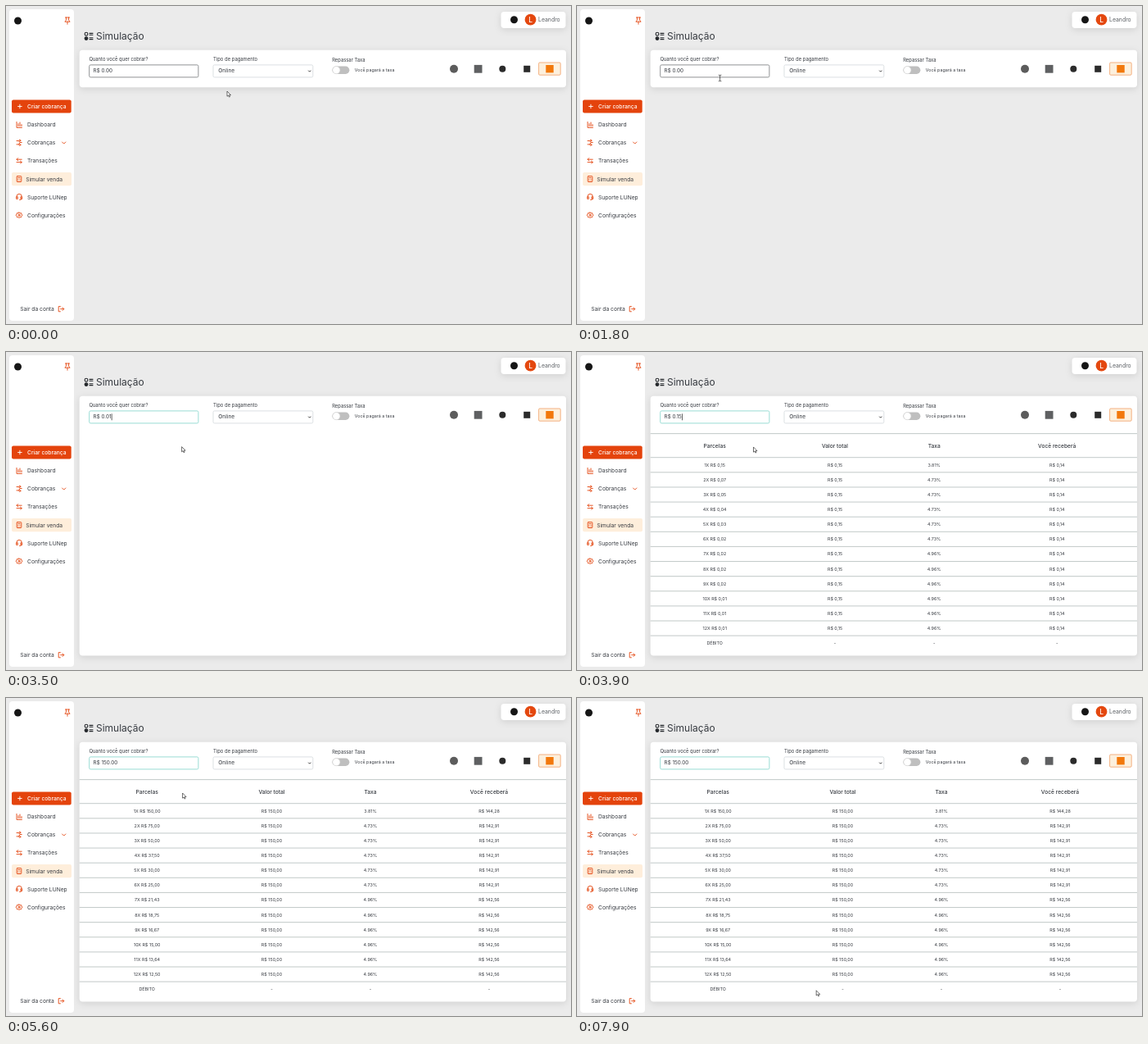
An HTML page that plays this animation: 690x388 px, repeating every 8 s.

```html
<!DOCTYPE html>
<html lang="pt-BR">
<head>
<meta charset="utf-8">
<title>Simulação</title>
<style>
  html, body { margin: 0; width: 100%; height: 100%; overflow: hidden; background: #ebebeb; }
  svg { display: block; width: 100vw; height: 100vh; }
  text { font-family: Inter, "Open Sans", sans-serif; fill: #363a40; white-space: pre; }
  .card { fill: #fff; filter: drop-shadow(0 2px 4px rgba(0, 0, 0, .11)); }
  .icon { fill: none; stroke: #e5501c; stroke-width: .95; stroke-linecap: round; stroke-linejoin: round; }
  .rule { stroke: #b3bbba; stroke-width: .8; }
  .mid { text-anchor: middle; }
</style>
</head>
<body>
<svg id="stage" viewBox="0 0 690 388">
  <rect width="690" height="388" fill="#ebebeb"/>
  <rect x="4" y="4" width="79" height="380" rx="4" fill="#fff"/>
  <circle cx="14.5" cy="18" r="4.5" fill="#161616"/>
  <path class="icon" d="M72.5 14h5M73.4 14v3.2l-1.5 2h6.2l-1.5-2V14M75 19.2v3"/>

  <rect x="7" y="114.5" width="72.7" height="16" rx="2" fill="#e4430c"/>
  <path d="M14.2 122.5h5.4M16.9 119.8v5.4" stroke="#fff" stroke-width=".9"/>
  <rect x="7" y="203" width="73" height="16.3" rx="2" fill="#feeedb"/>

  <g class="icon">
    <path d="M13 141.4v7h6.4M15 146.6v-3M17 146.6v-4.6M19 146.6v-2"/>
    <path d="M13 164.5h2.2l2 2-2 2.4H13M17.2 166.5h2"/>
    <circle cx="16.8" cy="164.2" r="1"/><circle cx="16.8" cy="169.4" r="1"/>
    <path d="M68.6 166l2.1 2.1 2.1-2.1"/>
    <path d="M13 187.2h6.2M14.6 185.6L13 187.2l1.6 1.4M19.2 190.6H13M17.6 189.2l1.6 1.4-1.6 1.6"/>
    <rect x="13.2" y="207.6" width="5.6" height="7" rx=".8"/>
    <path d="M14.8 209.6h2.4M14.8 211.6h.1M17 211.6h.1M14.8 213.2h.1M17 213.2h.1"/>
    <path d="M13 233.4v-1a3.1 3.1 0 0 1 6.2 0v2.6q0 1.6-2.6 1.6M13 232.8h1.3v2.6H13zM19.2 232.8h-1.3v2.6h1.3z"/>
    <path d="M16 251.8l1.1 1 1.5-.2.4 1.5 1 1-1 1.2-.4 1.5-1.5-.2-1.1 1-1.1-1-1.5.2-.4-1.5-1-1.2 1-1 .4-1.5 1.5.2z"/>
    <circle cx="16" cy="255.2" r="1.1"/>
    <path d="M66.4 366.6h-2.2v6.2h2.2M66.6 369.7h4M69 367.9l1.8 1.8-1.8 1.8"/>
  </g>

  <rect class="card" x="604.5" y="7" width="79" height="20" rx="4"/>
  <circle cx="620.5" cy="16.7" r="4.5" fill="#161616"/>
  <circle cx="640.5" cy="16.7" r="6.9" fill="#e4480f"/>

  <g stroke="#25282c" stroke-width="1.1" fill="none">
    <circle cx="98" cy="34.2" r="1.9"/>
    <circle cx="98" cy="39.6" r="1.9" fill="#25282c"/>
    <path d="M101.6 33.4h4.8M101.6 35.2h4.8M101.6 38.8h4.8M101.6 40.6h4.8"/>
  </g>

  <rect class="card" id="panel" x="89.7" y="53.7" width="594.3" rx="4"/>
  <rect id="field" x="101.7" y="71.9" width="133.2" height="15" rx="1.6" fill="#fff" stroke-width=".9"/>
  <rect x="253" y="71.9" width="121.8" height="15" rx="1.6" fill="#fff" stroke="#d4d9dc" stroke-width=".8"/>
  <path d="M369.2 78.7l1.5 1.5 1.5-1.5" fill="none" stroke="#333" stroke-width=".95"/>
  <rect x="398.4" y="73.5" width="21" height="9.4" rx="4.7" fill="#bfbfbf"/>
  <circle cx="403.4" cy="78.2" r="4.5" fill="#fff" stroke="#d2d2d2" stroke-width=".5"/>

  <circle cx="547" cy="76.8" r="5" fill="#5c5c5c"/>
  <rect x="571.7" y="71.9" width="9.8" height="9.8" fill="#5f6062"/>
  <circle cx="606.3" cy="76.8" r="4" fill="#2b2b2b"/>
  <rect x="632.2" y="72.8" width="8" height="8" fill="#2b2b2b"/>
  <rect x="650.6" y="69" width="26.6" height="15.2" rx="1.2" fill="#fdf0dd" stroke="#f0a067" stroke-width=".8"/>
  <rect x="659.3" y="72" width="9.4" height="9.4" fill="#f2780c"/>

  <g id="labels"></g>
  <text x="106.6" y="81.4" font-size="6.3" id="amount"></text>
  <rect id="caret" y="75.3" width=".7" height="8" fill="#222"/>
  <g id="table"></g>
  <path id="arrow" d="M0 0V6.2L1.5 5 2.5 7.1 3.5 6.6 2.6 4.6H4.5Z" fill="#fff" stroke="#222" stroke-width=".65"/>
  <path id="beam" d="M-1.7-3.8Q0-3.8 0-3Q0-3.8 1.7-3.8M0-3V3M-1.7 3.8Q0 3.8 0 3Q0 3.8 1.7 3.8" fill="none" stroke="#333" stroke-width=".75"/>
</svg>
<script>
const LOOP = 8000, STEP = 100;
const NS = "http://www.w3.org/2000/svg";
const $ = id => document.getElementById(id);

function add(parent, tag, attrs, content = "") {
  const el = document.createElementNS(NS, tag);
  for (const key in attrs) el.setAttribute(key, attrs[key]);
  el.textContent = content;
  parent.appendChild(el);
  return el;
}

// content, x, baseline, size, weight, colour
const LABELS = [
  ["Criar cobrança", 26, 124.9, 6.7, 500, "#fff"],
  ["Dashboard", 26, 147.2, 6.7],
  ["Cobranças", 26, 169.2, 6.7],
  ["Transações", 26, 191.4, 6.7],
  ["Simular venda", 24.2, 213.6, 6.7],
  ["Suporte LUNep", 26, 235.7, 6.7],
  ["Configurações", 26, 257.8, 6.7],
  ["Sair da conta", 17.3, 372.2, 6.7],
  ["Leandro", 650, 19, 6.9, 400, "#5b5f64"],
  ["L", 638.3, 19.9, 8.4, 500, "#fff"],
  ["Simulação", 110, 40.6, 12],
  ["Quanto você quer cobrar?", 101.4, 66.8, 5.85],
  ["Tipo de pagamento", 253, 66.8, 5.9],
  ["Online", 259.3, 81.4, 6.6],
  ["Repassar Taxa", 398.2, 67.8, 5.85],
  ["Você pagará a taxa", 425.8, 80, 5.35]
];
for (const [content, x, y, size, weight = 400, color = "#363a40"] of LABELS)
  add($("labels"), "text", { x, y, "font-size": size, "font-weight": weight, style: `fill:${color}` }, content);

// Table skeleton: one header row, twelve instalments, one debit row
const ROW = 18.12;
const rows = [];
add($("table"), "path", { class: "rule", d: "M89.7 99.6H684" });
for (let i = 0; i < 13; i++)
  add($("table"), "path", { class: "rule", d: `M89.7 ${128.7 + ROW * i}H684` });
for (let i = 0; i < 14; i++) {
  const y = i ? 139.7 + ROW * (i - 1) : 116.5;
  rows.push([0, 1, 2, 3].map(() =>
    add($("table"), "text", { class: "mid", y, "font-size": i ? 5.4 : 6.65, "font-weight": i ? 400 : 450 })));
}

const money = v => "R$ " + v.toFixed(2).replace(".", ",");
const feeOf = n => n === 1 ? 381 : n < 7 ? 473 : 496;

function cells(row, total) {
  if (row === 0) return ["Parcelas", "Valor total", "Taxa", "Você receberá"];
  if (row === 13) return ["DÉBITO", "-", "-", "-"];
  const fee = feeOf(row);
  return [`${row}X ${money(total / row)}`, money(total), (fee / 100).toFixed(2) + "%",
    money(total * (10000 - fee) / 10000)];
}

let shown = null;
function fillTable(total) {
  if (total === shown) return;
  shown = total;
  const centers = total >= 100 ? [172.2, 324.5, 445, 590] : [168.2, 315, 436.2, 586.2];
  rows.forEach((row, i) => cells(i, total).forEach((content, c) => {
    row[c].textContent = content;
    row[c].setAttribute("x", centers[c]);
  }));
}

// [start, amount]
const TYPING = [[0, 0], [3500, .01], [3700, .15], [4000, 1.5], [4400, 15], [4900, 150]];
// [start, visible]
const CARET = [[0, 0], [2000, 1], [2500, 0], [3000, 1], [5600, 0], [6100, 1], [6600, 0], [7100, 1], [7600, 0]];
// [time, x, y] of the pointer tip
const PATH = [
  [0, 270, 104], [700, 174.6, 88], [2300, 174.6, 88], [3200, 212.5, 114.5], [3400, 213.6, 115.2],
  [3500, 214.6, 115.6], [4000, 215.6, 116], [5700, 215.6, 116], [6600, 293.2, 212],
  [7500, 463, 260.5], [7600, 480, 288], [7700, 432, 322], [7900, 292.2, 356.8], [8000, 292.2, 356.8]
];

const at = (list, t) => list.filter(s => s[0] <= t).pop()[1];

function pointer(t) {
  const i = PATH.findIndex(p => p[0] > t);
  const [t0, x0, y0] = PATH[i - 1], [t1, x1, y1] = PATH[i];
  const u = (t - t0) / (t1 - t0);
  const k = t1 - t0 > 300 ? u * u * (3 - 2 * u) : u;
  return [x0 + (x1 - x0) * k, y0 + (y1 - y0) * k];
}

const show = (id, on) => $(id).setAttribute("visibility", on ? "visible" : "hidden");

function draw(t) {
  const amount = at(TYPING, t);
  $("amount").textContent = "R$ " + amount.toFixed(2);
  $("caret").setAttribute("x", 106.9 + $("amount").getComputedTextLength());
  show("caret", at(CARET, t));
  $("field").setAttribute("stroke", t < 2200 ? "#858789" : "#8ed8d0");
  $("panel").setAttribute("height", t < 3500 ? 45.6 : 316.8);
  show("table", t >= 3600);
  fillTable(amount);

  const [x, y] = pointer(t);
  const overField = x > 101 && x < 235 && y > 71 && y < 88.6;
  show("beam", overField);
  show("arrow", !overField);
  $(overField ? "beam" : "arrow").setAttribute("transform", `translate(${x} ${y})`);
}

const start = performance.now();
function tick() {
  const t = (performance.now() - start) % LOOP;
  draw(Math.floor(t / STEP) * STEP);
  requestAnimationFrame(tick);
}
tick();
</script>
</body>
</html>
```
